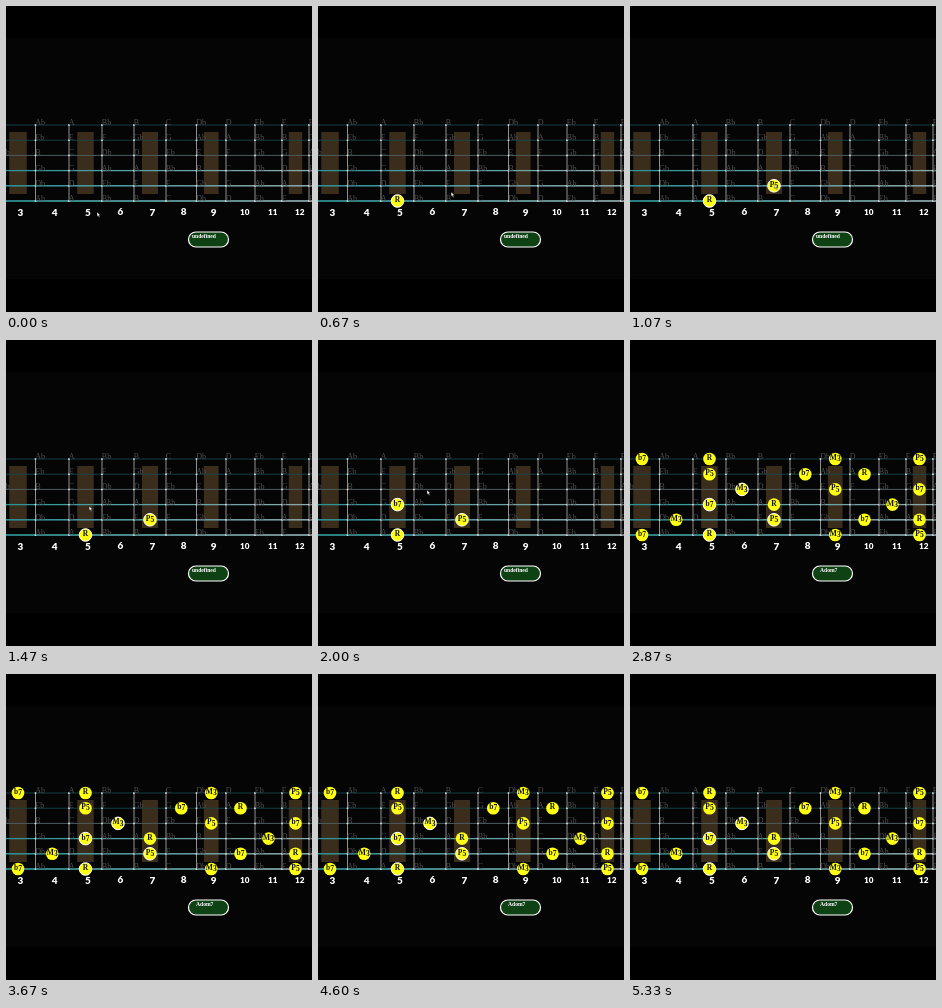
Recreate the animation shown at these times as an HTML page. Size 306x306 px, loop 5.39 s.

```html
<!DOCTYPE html>
<html lang="en">
<head>
<meta charset="utf-8">
<title>Fretboard chord</title>
<style>
html, body { margin: 0; width: 100%; height: 100%; overflow: hidden; background: #000; }
svg { display: block; width: 100vw; height: 100vh; }
.label { font: 8px "Liberation Serif", serif; fill: #505050; }
.degree { font: bold 7.5px "Liberation Serif", serif; fill: #111; text-anchor: middle; }
.fret { font: 900 10px Lato, sans-serif; fill: #fff; }
.small { font-size: 8.2px; }
.chord { font: bold 5.6px "Liberation Serif", serif; fill: #fff; }
.dot circle { fill: #ffff12; }
.picked circle { stroke: #fff; stroke-width: 1; }
.dot, .chord { animation: 5390ms step-end infinite; }
.dot { animation-name: all; }
.root { animation-name: first; }
.fifth { animation-name: second; }
.seventh { animation-name: third; }
.third, .named { animation-name: fourth; }
.unnamed { animation-name: leave; }
#cursor { animation: move 5390ms linear infinite, leave 5390ms step-end infinite; }
@keyframes first { 0% { opacity: 0 } 8.7%, 100% { opacity: 1 } }
@keyframes second { 0% { opacity: 0 } 19.8%, 100% { opacity: 1 } }
@keyframes third { 0% { opacity: 0 } 29.6%, 100% { opacity: 1 } }
@keyframes fourth { 0% { opacity: 0 } 40.8%, 100% { opacity: 1 } }
@keyframes all { 0% { opacity: 0 } 53.2%, 100% { opacity: 1 } }
@keyframes leave { 0% { opacity: 1 } 40.8%, 100% { opacity: 0 } }
@keyframes move {
  0%, 1.2% { transform: translate(91px, 206px) }
  2.4%, 6% { transform: translate(79px, 190px) }
  6.1%, 8.7% { transform: translate(79px, 193px) }
  12.4% { transform: translate(133px, 186px) }
  18.5%, 19.8% { transform: translate(145px, 178px) }
  27.3% { transform: translate(83px, 166px) }
  29.7% { transform: translate(84px, 163px) }
  31% { transform: translate(91px, 158px) }
  37.1%, 100% { transform: translate(109px, 150px) }
}
</style>
</head>
<body>
<svg viewBox="0 0 306 306">
  <defs>
    <linearGradient id="steel" gradientUnits="userSpaceOnUse" x1="0" y1="0" x2="306" y2="0">
      <stop offset="0" stop-color="#2c9296"/>
      <stop offset=".3" stop-color="#4b9ea2"/>
      <stop offset="1" stop-color="#8fa9ab"/>
    </linearGradient>
  </defs>
  <rect y="32" width="306" height="241" fill="#050505"/>
  <g id="board"></g>
  <rect x="182.5" y="226" width="40" height="15" rx="7.5" fill="#0e4215" stroke="#fff" stroke-width="1.2"/>
  <text class="chord unnamed" x="186" y="232">undefined</text>
  <text class="chord named" x="190" y="232">Adom7</text>
  <path id="cursor" d="M0 0V4.6L1.1 3.6L2 5.4L2.8 5L2 3.3H3.4Z" fill="#fff" stroke="#000" stroke-width=".4"/>
</svg>
<script>
const board = document.getElementById("board");
const wires = [-5.5, 29.5, 63, 96, 128, 160, 190.5, 220, 249, 276, 303, 329];
const firstFret = 3;
const notes = "A Bb B C Db D Eb E F Gb G Ab".split(" ");
const open = [7, 2, 10, 5, 0, 7]; // semitones above A, top string first
const degrees = { 0: "R", 4: "M3", 7: "P5", 10: "b7" };
const picks = { "5,5": "root", "4,7": "fifth", "3,5": "seventh", "2,6": "third" };
const strings = [["#174b50", .8], ["#174b50", .8], ["#4c5c5d", 1],
  ["url(#steel)", 1.3], ["url(#steel)", 1.5], ["url(#steel)", 1.7]];
const rowY = row => 119 + row * 15.2;
const middle = i => (wires[i] + wires[i + 1]) / 2;

function add(tag, attrs, text = "", parent = board) {
  const el = document.createElementNS("http://www.w3.org/2000/svg", tag);
  for (const key in attrs) el.setAttribute(key, attrs[key]);
  el.textContent = text;
  return parent.appendChild(el);
}

// Old-style figures: 3, 4, 5, 7 and 9 hang below the baseline.
function figures(parent, text, drop) {
  let shift = 0;
  for (const ch of text) {
    const y = "34579".includes(ch) ? drop : 0;
    add("tspan", { dy: y - shift, class: "012".includes(ch) ? "small" : "" }, ch, parent);
    shift = y;
  }
}

for (const fret of [3, 5, 7, 9, 12]) {
  const i = fret - firstFret, w = (wires[i + 1] - wires[i]) / 2;
  add("rect", { x: middle(i) - w / 2, y: 126, width: w, height: 62, fill: "#3a2d1b" });
}
strings.forEach(([color, width], row) =>
  add("rect", { x: 0, y: rowY(row) - width / 2, width: 306, height: width, fill: color }));

wires.forEach((x, i) => {
  add("path", { d: `M${x} 119V195`, stroke: "#b4b4b4", "stroke-width": .8 });
  for (let row = 0; row < 6; row++) {
    add("circle", { cx: x, cy: rowY(row), r: .9, fill: "#ddd" });
    const note = notes[(open[row] + firstFret + i) % 12];
    add("text", { class: "label", x: x - .2, y: rowY(row) }, note);
  }
});

for (let i = 0; i < 10; i++) {
  const fret = firstFret + i, x = middle(i);
  figures(add("text", { class: "fret", x: x - .5, y: 208.6 }), String(fret), 1.2);
  for (let row = 0; row < 6; row++) {
    const degree = degrees[(open[row] + fret) % 12];
    if (!degree) continue;
    const pick = picks[[row, fret]];
    const dot = add("g", { class: "dot" + (pick ? " picked " + pick : "") });
    add("circle", { cx: x, cy: rowY(row), r: 6.3 }, "", dot);
    figures(add("text", { class: "degree", x, y: rowY(row) + 1 }, "", dot), degree, 1.2);
  }
}
</script>
</body>
</html>
```
